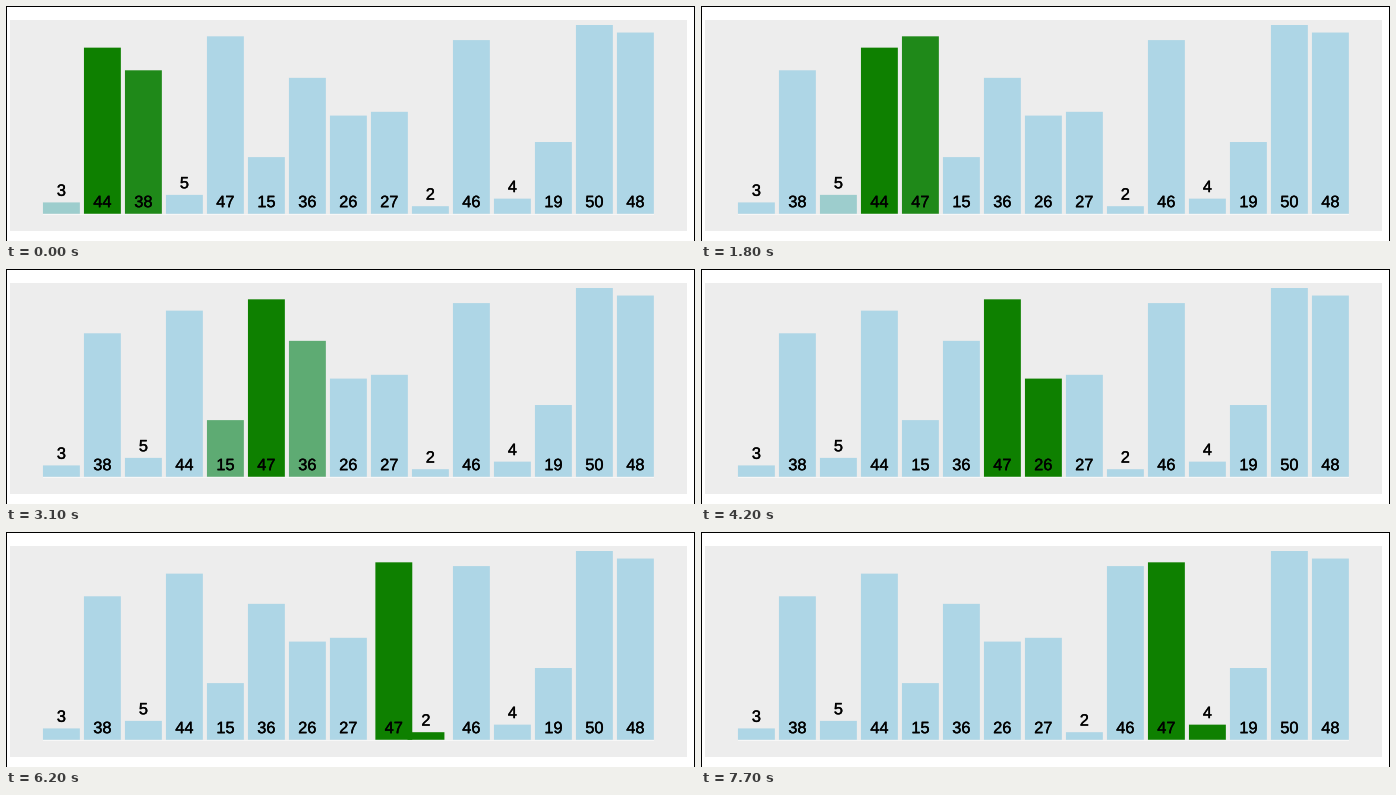
A matplotlib script that plays this animation: 689 by 235 pixels, repeating every 8 s.

```python
import matplotlib.pyplot as plt
from matplotlib.animation import FuncAnimation
from matplotlib.colors import to_rgb
from matplotlib.patches import Rectangle
from matplotlib.patheffects import withStroke

W, H, DPI = 689, 235, 64
STEP_MS, LOOP_MS = 100, 8000
PHASE_MS, EASE_MS, FIRST_MS = 450, 250, -175

VALUES = [3, 44, 38, 5, 47, 15, 36, 26, 27, 2, 46, 4, 19, 50, 48]
LEFT, PITCH, BAR_W, BASE, UNIT = 36.95, 41, 36.9, 207.75, 3.775
LIGHT, ACTIVE = to_rgb("#aed6e6"), to_rgb("#0e8000")
PX = 72 / DPI


def cubic_in_out(t):
    t = min(max(t, 0), 1)
    return 4 * t**3 if t < 0.5 else 1 - 4 * (1 - t)**3


def mix(a, b, p):
    return tuple(u + (v - u) * p for u, v in zip(a, b))


def state(t):
    """Slot and colour of every value at time t of a bubble-sort pass.

    Each comparison is a colour fade, followed by a swap if needed.
    """
    order = list(VALUES)
    slots = {v: i for i, v in enumerate(order)}
    colors = {v: LIGHT for v in order}
    colors[order[0]] = colors[order[1]] = ACTIVE
    start = FIRST_MS
    for j in range(1, len(order) - 1):
        if start > t:
            break
        p = cubic_in_out((t - start) / EASE_MS)
        colors[order[j - 1]] = mix(ACTIVE, LIGHT, p)
        colors[order[j + 1]] = mix(LIGHT, ACTIVE, p)
        start += PHASE_MS
        a, b = order[j], order[j + 1]
        if a > b:
            p = cubic_in_out((t - start) / EASE_MS)
            slots[a], slots[b] = j + p, j + 1 - p
            order[j], order[j + 1] = b, a
            start += PHASE_MS
    return slots, colors


fig = plt.figure(figsize=(W / DPI, H / DPI), dpi=DPI, facecolor="white")
ax = fig.add_axes([0, 0, 1, 1])
ax.set(xlim=(0, W), ylim=(H, 0))
ax.axis("off")


def box(x, y, w, h, color, **kwargs):
    return ax.add_patch(Rectangle((x, y), w, h, fc=color, lw=0, **kwargs))


box(0, 0, W, 1, "black")
box(0, 0, 1, H, "black")
box(W - 1, 0, 1, H, "black")
box(4, 14, 677, 211, "#ededed")
box(37, 208, 611, 1, "#f7f7f7")

# A hairline stroke gives the labels the weight of smoothed screen text.
smoothing = [withStroke(linewidth=0.35 * PX, foreground="black")]
bars, labels = {}, {}
for value in VALUES:
    height = value * UNIT
    top = BASE - height
    bars[value] = box(LEFT, top, BAR_W, height, LIGHT, snap=False, zorder=2)
    baseline = (BASE if height > 25 else top) - 6.6
    labels[value] = ax.text(0, baseline, str(value), ha="center", va="baseline",
                            family="Liberation Sans", size=16.4 * PX,
                            color="black", path_effects=smoothing, zorder=3)


def update(frame):
    slots, colors = state(frame * STEP_MS)
    for value, bar in bars.items():
        x = LEFT + PITCH * slots[value]
        bar.set_x(x)
        bar.set_facecolor(colors[value])
        labels[value].set_x(x + BAR_W / 2)
    return [*bars.values(), *labels.values()]


anim = FuncAnimation(fig, update, frames=LOOP_MS // STEP_MS, interval=STEP_MS,
                     repeat=True, repeat_delay=0)
plt.show()
```
